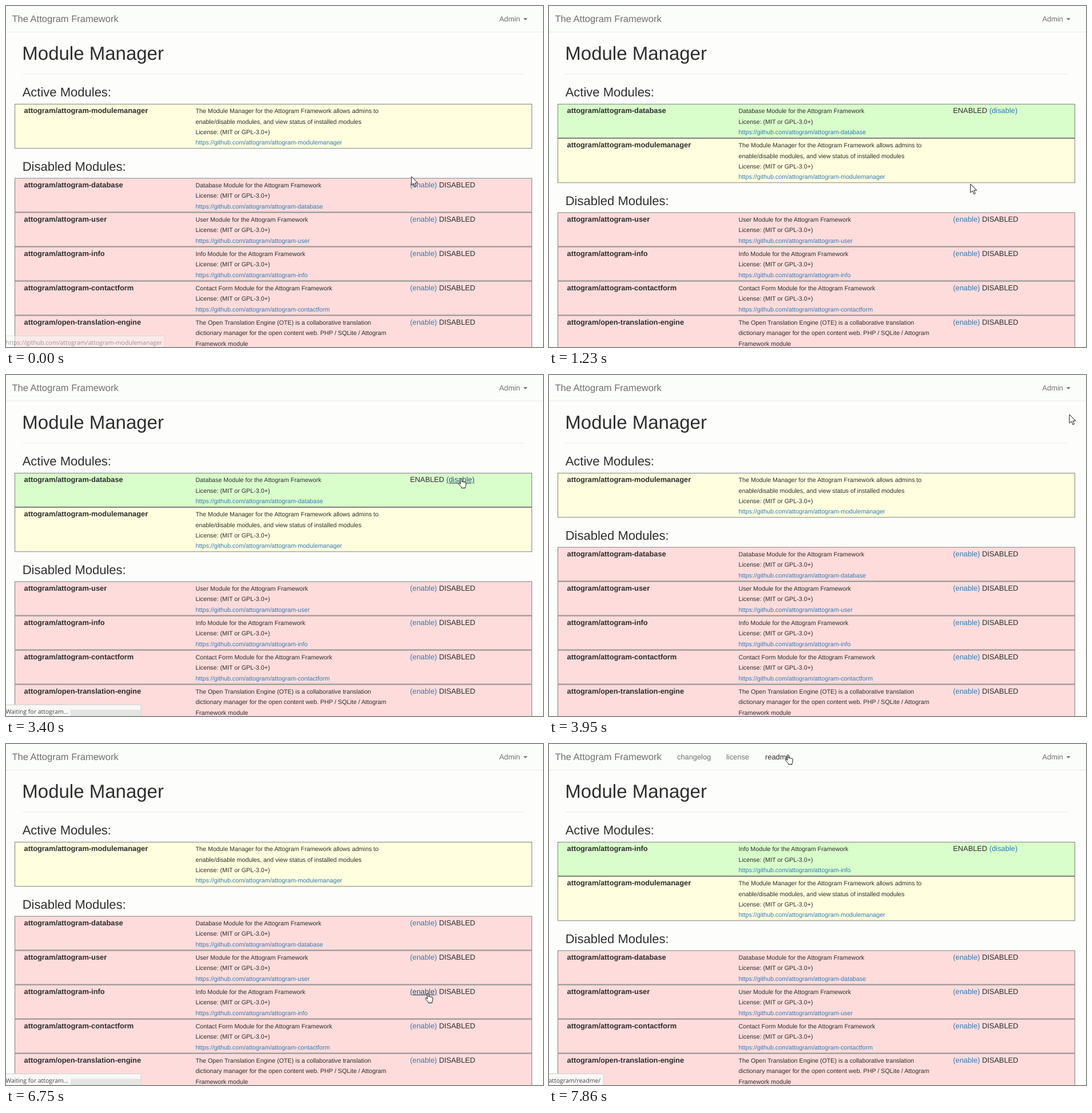
Write an HTML page that moves like this. It is 939 px wide and 596 px high and loops after 8000 ms.

```html
<!DOCTYPE html>
<html lang="en">
<head>
<meta charset="utf-8">
<title>Module Manager</title>
<style>
  html, body { margin: 0; width: 100%; height: 100%; overflow: hidden; background: #fdfefc; }
  svg { display: block; }
  text { font: 12.83px "Liberation Sans", Arial, sans-serif; fill: #2d2d2d; text-rendering: geometricPrecision; white-space: pre; }
  .h1 { font-size: 33px; }
  .h3 { font-size: 22px; }
  .brand { font-size: 16.5px; }
  .brand, .nav { fill: #707070; }
  .nav.on { fill: #2d2d2d; }
  .name { font-weight: bold; }
  .small { font-size: 10.72px; }
  .link { fill: #337ab7; }
  .link.on { fill: #23527c; text-decoration: underline; }
  .status { font: 10.5px "Open Sans", "Noto Sans", sans-serif; fill: #444; }
</style>
</head>
<body>
<svg id="stage" width="939" height="596" viewBox="0 0 939 596"></svg>
<script>
const LOOP = 8000;
const LINE = 18.33;
const stage = document.getElementById('stage');

const simple = (id, label) => ({
  id, name: 'attogram/attogram-' + id,
  lines: [label + ' Module for the Attogram Framework'],
});
const MANAGER = {
  id: 'modulemanager', name: 'attogram/attogram-modulemanager',
  lines: ['The Module Manager for the Attogram Framework allows admins to',
    'enable/disable modules, and view status of installed modules'],
};
const MODULES = [
  simple('database', 'Database'),
  simple('user', 'User'),
  simple('info', 'Info'),
  simple('contactform', 'Contact Form'),
  {
    id: 'ote', name: 'attogram/open-translation-engine',
    lines: ['The Open Translation Engine (OTE) is a collaborative translation',
      'dictionary manager for the open content web. PHP / SQLite / Attogram',
      'Framework module'],
  },
];

// The screen is refreshed in bursts: [first, last, number of steps].
const BURSTS = [
  [120, 1110, 8], [1230, 2170, 7], [2730, 3680, 8], [3800, 4490, 6],
  [4890, 5810, 8], [5940, 6880, 8], [7030, 7860, 7],
];
const STEPS = [0, ...BURSTS.flatMap(([from, to, n]) =>
  Array.from({ length: n }, (_, i) => from + (to - from) * i / (n - 1)))];

// Pointer path: [time, x, y].
const PATH = [
  [0, 709, 298], [260, 711, 293], [400, 718, 300], [680, 737, 311], [1387, 737, 311],
  [1700, 830, 150], [2013, 908, 22], [2170, 911, 21], [2730, 911, 21],
  [3000, 850, 120], [3140, 796, 181], [3410, 796, 181],
  [3680, 870, 120], [3938, 910, 69], [4214, 909, 22], [4890, 909, 21],
  [5150, 800, 50], [5416, 648, 84], [5810, 668, 112], [6074, 700, 165],
  [6343, 732, 300], [6612, 738, 436], [7030, 738, 436],
  [7445, 560, 180], [7722, 412, 4], [7860, 418, 19], [8000, 418, 19],
];

function pointerAt(t) {
  const i = Math.max(1, PATH.findIndex(p => p[0] >= t));
  const [t0, x0, y0] = PATH[i - 1], [t1, x1, y1] = PATH[i];
  const k = (t - t0) / (t1 - t0);
  return { x: x0 + (x1 - x0) * k, y: y0 + (y1 - y0) * k };
}

const between = (t, from, to) => t >= from && t < to;
const text = (x, y, cls, str) => `<text x="${x}" y="${y}" class="${cls}">${str}</text>`;
const rect = (x, y, w, h, fill, more = '') =>
  `<rect x="${x}" y="${y}" width="${w}" height="${h}" fill="${fill}" ${more}/>`;

function statusBar(message, width, faded) {
  return `<g opacity="${faded ? 0.5 : 1}">` +
    rect(-3, 576.5, width + 3, 24, '#f8f9f7', 'rx="2" stroke="#cfd0ce"') +
    (message.startsWith('Waiting') ? rect(113, 585, 123, 11, '#e4e5e3') : '') +
    text(-0.5, 591.5, 'status', message) + '</g>';
}

function cursor({ x, y }, hand) {
  const shape = hand
    ? 'M-1.4 9.5V1.2a1.3 1.3 0 0 1 2.6 0V6a1.3 1.3 0 0 1 2.4.3 1.3 1.3 0 0 1 2.4.5 1.2 1.2 0 0 1 2.2.8V11q0 2-1.2 3.5V16.5H.6V15.2Q-2 12.5-4.6 9.3a1.2 1.2 0 0 1 1.8-1.4Z'
    : 'M0 0V15.2L3.6 12 6 17.8 8.4 16.7 6.1 11.2H10.8Z';
  return `<path transform="translate(${x} ${y})" d="${shape}" fill="#fff" stroke="#111"/>`;
}

function draw(t) {
  const enabled = between(t, 1230, 3400) ? 'database' : t >= 6875 ? 'info' : '';
  const menuOpen = between(t, 2160, 2950) || between(t, 4340, 5000);
  const waiting = between(t, 1100, 1230) || between(t, 3270, 3400) || between(t, 6740, 6875);
  const pointer = pointerAt(t);
  let target = '';

  const hit = (x0, y0, x1, y1, url) => {
    const inside = between(pointer.x, x0, x1) && between(pointer.y, y0, y1);
    if (inside) target = url;
    return inside ? ' on' : '';
  };

  function row(module, y, fill, state) {
    const height = (module.lines.length + 2) * LINE + 5;
    const base = y + 16.3;
    const lines = [...module.lines, 'License: (MIT or GPL-3.0+)'];
    let out = rect(15.5, y + 0.5, 904, height - 1, fill, 'stroke="#808080"') +
      text(31.5, base, 'name', module.name);
    lines.forEach((line, i) => out += text(331.5, base + i * LINE, 'small', line));
    out += text(331.5, base + lines.length * LINE, 'small link', 'https://github.com/' + module.name);
    if (state) {
      const [x0, x1] = state === 'enable' ? [706, 754] : [770, 819];
      const on = hit(x0, y + 4, x1, y + 20, `attogram/module-admin/?${state}=${module.id}`);
      const link = `<tspan class="link${on}">(${state})</tspan>`;
      out += text(706.5, base, '', state === 'enable' ? link + ' DISABLED' : 'ENABLED ' + link);
    }
    return out;
  }

  let svg = rect(0, 0, 939, 45, '#fbfdfa') + rect(0, 45, 939, 1, '#e7e8e6') +
    text(10.5, 28.3, 'brand', 'The Attogram Framework');
  if (enabled === 'info') {
    for (const [x, label, right] of [[224, 'changelog', 297], [310, 'license', 364], [378, 'readme', 434]])
      svg += text(x, 27, 'nav' + hit(x - 14, 0, right, 45, `attogram/${label}/`), label);
  }
  const adminOn = hit(849, 0, 925, 45, 'attogram/module-admin/#');
  if (menuOpen) svg += rect(849, 0, 76, 45, '#e6e8e5');
  svg += text(862.5, 27, 'nav' + adminOn, 'Admin') +
    `<path d="M904.5 21.3h7.4l-3.7 3.7z" fill="${adminOn ? '#444' : '#707070'}"/>`;

  svg += text(28.3, 94, 'h1', 'Module Manager') + rect(29, 118.5, 878, 1, '#ecedeb') +
    text(28.7, 157.5, 'h3', 'Active Modules:');
  let y = 171;
  const active = MODULES.find(m => m.id === enabled);
  if (active) {
    svg += row(active, y, '#d9fecb', 'disable');
    y += 60;
  }
  svg += row(MANAGER, y, '#fffede', '') + text(28.7, y + 116.5, 'h3', 'Disabled Modules:');
  y += 129.6;
  for (const module of MODULES.filter(m => m !== active)) {
    svg += row(module, y, '#fddcdb', 'enable');
    y += 60;
  }

  if (menuOpen) {
    const items = enabled ? ['db-admin', 'db-tables', 'events', 'module-admin'] : ['module-admin'];
    const height = items.length * 23.85 + 9.5;
    svg += rect(779, 52, 148, height, '#dfe2e0', 'rx="7" opacity=".8"') +
      rect(779.5, 45.5, 145, height, '#fcfefb', 'rx="3" stroke="#d2d4d2"');
    items.forEach((item, i) => svg += text(798, 66.5 + i * 23.85, '', item));
  }

  if (waiting) svg += statusBar('Waiting for attogram...', 236);
  else if (t < 120) svg += statusBar('https://github.com/attogram/attogram-modulemanager', 277, true);
  else if (target) svg += statusBar(target, target.length * 5.7 + 4);

  stage.innerHTML = svg + cursor(pointer, target);
}

let shown = -1;
function tick() {
  const now = performance.now() % LOOP;
  const step = STEPS.findLast(s => s <= now);
  if (step !== shown) draw(shown = step);
  requestAnimationFrame(tick);
}
tick();
</script>
</body>
</html>
```
